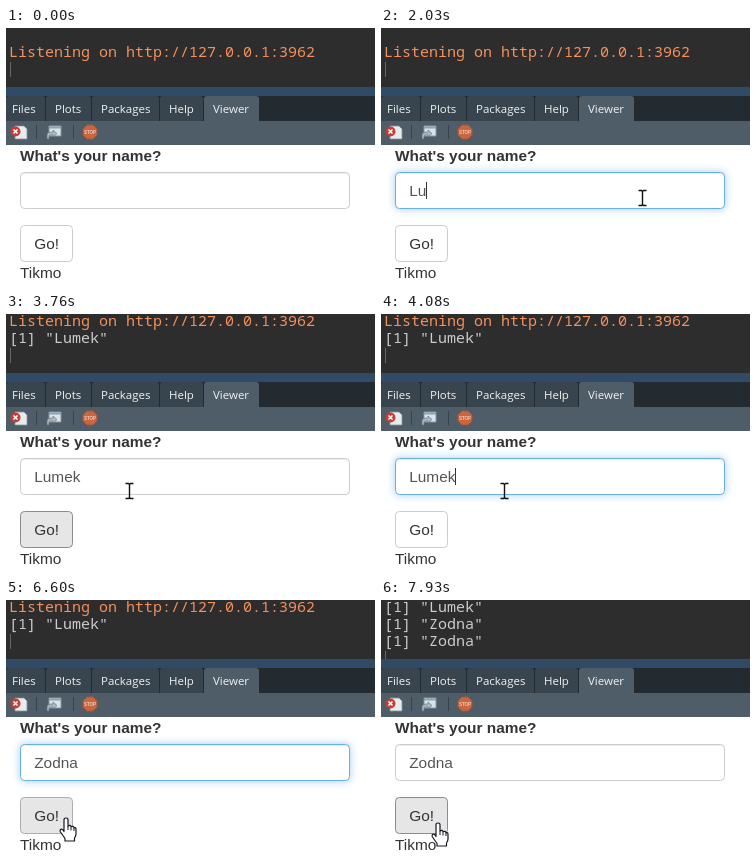
These frames come from a looping animation (369x258 px, 8000 ms). An HTML page:

```html
<!DOCTYPE html>
<html lang="en">
<head>
<meta charset="utf-8">
<style>
html, body { margin: 0; width: 100%; height: 100%; overflow: hidden; background: #fff; }
#stage { position: absolute; left: 0; top: 0; width: 369px; height: 258px; overflow: hidden; background: #fff;
  font: 15.4px/22px "Liberation Sans", Arial, sans-serif; color: #333; }
#stage div, #stage svg { position: absolute; box-sizing: border-box; white-space: pre; }
#console { left: 0; top: 0; width: 369px; height: 59px; overflow: hidden; background: #2d2d2d;
  font: 15px/17.3px "Noto Sans Mono", monospace; color: #ccc; }
#console div { left: 3px; }
#console .note { color: #f4905c; }
#console #prompt { left: 4px; width: 1px; height: 15px; background: #666; }
#label { left: 14px; top: 117px; font-weight: bold; }
#field { left: 14px; top: 144px; width: 330px; height: 37.4px; padding: 6.7px 13.2px; border: 1.1px solid; border-radius: 4.4px; color: #555; background: #fff; }
#caret { display: inline-block; width: 1px; height: 17px; margin-right: -1px; vertical-align: -3.5px; background: #333; }
#go { left: 14px; top: 197px; width: 53.4px; height: 37.4px; line-height: 35.2px; text-align: center; border: 1.1px solid; border-radius: 4.4px; }
#greeting { left: 14px; top: 233.7px; }
</style>
</head>
<body>
<div id="stage">
  <div id="console"></div>
  <svg id="panel" style="left:0;top:59px" width="369" height="58" viewBox="0 59 369 58">
    <rect y="59" width="369" height="58" fill="#314a66"/>
    <rect y="68" width="369" height="26" fill="#232b31"/>
    <g id="tabs" font-family="'Open Sans', 'Noto Sans', sans-serif" font-size="11.5" fill="#f0f2f3"></g>
    <rect y="93" width="369" height="24" fill="#4e5d68"/>
    <path d="M30.5 97v14M67.5 97v14" stroke="#37434c"/>
    <path d="M9 98h9l3 3v10H9z" fill="#e9ecee" stroke="#87939b" stroke-width=".8"/>
    <circle cx="9.5" cy="103.5" r="5" fill="#c83c34"/>
    <path d="M7.5 101.5l4 4m0-4l-4 4" stroke="#fff" stroke-width="1.5"/>
    <path d="M43 98h12v10H43z" fill="#dce3e7" stroke="#8494a0"/>
    <path d="M43 99.5h12" stroke="#8ba4b5" stroke-width="2"/>
    <path d="M41 111v-4q0-3 4-3h2v-2l4 3.5-4 3.5v-2h-2q-2 0-2 2v2z" fill="#a9b7c0" stroke="#60717d" stroke-width=".6"/>
    <path d="M81 97h6l4 4v6l-4 4h-6l-4-4v-6z" fill="#c9663f" stroke="#a5563b"/>
    <text x="84" y="106" text-anchor="middle" font-family="Liberation Sans, sans-serif" font-size="4.5" font-weight="bold" fill="#f0cbb9">STOP</text>
  </svg>
  <div id="label">What's your name?</div>
  <div id="field"><span id="value"></span><span id="caret"></span></div>
  <div id="go">Go!</div>
  <div id="greeting">Tikmo</div>
  <svg style="left:0;top:0" width="369" height="258">
    <g id="mouse">
      <circle id="halo" r="11" fill="#f0e428" fill-opacity=".72"/>
      <path id="beam" d="M-4 -7.5h3l1 1 1-1h3M-4 7.5h3l1-1 1 1h3M0 -7v14" fill="none" stroke="#111" stroke-width="1.4"/>
      <path id="hand" d="M-2 1.8Q-2 0 0 0T2 1.8V8Q4.5 6.5 5 8.7 7.5 7.6 8 9.8 10 9 10 11.5V16Q10 18 8.5 20V23H-1V20.5L-5.5 14Q-6.5 12-5 11.3T-2 13.5Z" fill="#fff" stroke="#15151f" stroke-width="1.2" stroke-linejoin="round"/>
      <path id="handLines" d="M2 8v4M5 9v3.5M8 10v3" stroke="#15151f"/>
      <path id="arrow" d="M0 0V16L3.7 12.5 6.2 18.3 8.7 17.2 6.2 11.6H11.2Z" fill="#fff" stroke="#111"/>
    </g>
  </svg>
</div>
<script>
const LOOP = 8000;
const $ = id => document.getElementById(id);
const FIRST = "Lumek", SECOND = "Zodna";

const tabs = [["Files", 0, 39, 6], ["Plots", 40, 85, 49], ["Packages", 86, 153, 95], ["Help", 154, 197, 163], ["Viewer", 198, 253, 207]];
$("tabs").innerHTML = tabs.map(([name, left, right, x]) =>
  `<path d="M${left} 94V71q0-3 3-3H${right - 3}q3 0 3 3V94z" fill="${name === "Viewer" ? "#4e5d68" : "#39454e"}"/>
   <text x="${x}" y="85">${name}</text>`).join("");

// [time, x, y]
const path = [[330, 292, 250], [740, 261.5, 170], [2660, 261.5, 170], [3130, 47, 215], [3500, 47, 215],
  [3750, 123.5, 177], [6410, 123.5, 177], [6600, 60, 218], [6690, 58, 228], [6820, 57, 224], [7270, 57, 224], [7280, 57, 223]];

// [time, text, caret end]
const typing = [[0, "", 0], [850, "", 1370], [1770, 1, 2030], [2030, 2, 2220], [2220, 3, 2290], [2290, 4, 2360], [2360, 5, 2860],
  [4010, 5, 4350], [5210, 1, 5410], [5410, 2, 5610], [5610, 3, 5810], [5810, 4, 6000], [6000, 5, 6500]];

const logs = [
  [0, ["", "Listening on http://127.0.0.1:3962"], 2],
  [3480, ["Listening on http://127.0.0.1:3962", `[1] "${FIRST}"`], 2],
  [7150, [`[1] "${FIRST}"`, `[1] "${SECOND}"`], 2],
  [7930, [`[1] "${FIRST}"`, `[1] "${SECOND}"`, `[1] "${SECOND}"`], 3]
];

const within = (t, ranges) => ranges.some(([a, b]) => t >= a && t < b);
const latest = (list, t) => list.filter(item => item[0] <= t).pop();
const clamp = v => Math.max(0, Math.min(1, v));
const mix = (a, b, k) => `rgb(${a.map((v, i) => Math.round(v + (b[i] - v) * k))})`;
const show = (id, on) => { $(id).style.display = on ? "" : "none"; };

function pointer(t) {
  const i = path.findIndex(p => p[0] > t);
  if (i < 0) return path[path.length - 1].slice(1);
  const a = path[Math.max(0, i - 1)], b = path[i];
  const k = clamp((t - a[0]) / (b[0] - a[0] || 1)), e = k * k * (3 - 2 * k);
  return [a[1] + (b[1] - a[1]) * e, a[2] + (b[2] - a[2]) * e];
}

let shownLog;
function drawConsole(t) {
  const log = latest(logs, t);
  if (log === shownLog) return;
  shownLog = log;
  const top = row => -2.4 + row * 17.3;
  $("console").innerHTML = log[1].map((line, row) =>
    `<div class="${line[0] === "L" ? "note" : ""}" style="top:${top(row)}px">${line}</div>`).join("") +
    `<div id="prompt" style="top:${top(log[2]) + 1.5}px"></div>`;
}

function drawField(t) {
  const [, count, caretEnd] = latest(typing, t);
  const selected = within(t, [[4350, 5210]]);
  const value = $("value");
  value.textContent = (t < 5210 ? FIRST : SECOND).slice(0, count || 0);
  value.style.background = selected ? "#3390ff" : "";
  value.style.color = selected ? "#fff" : "";
  const ramp = from => clamp((t - from) / 150);
  const focus = ramp(820) - ramp(3270) + ramp(3930) - ramp(6880);
  show("caret", t < caretEnd);
  $("field").style.borderColor = mix([204, 204, 204], [102, 175, 233], focus);
  $("field").style.boxShadow = `inset 0 1px 1px rgba(0,0,0,.075), 0 0 8px rgba(102,175,233,${0.6 * focus})`;
}

function drawButton(t, hover) {
  const pressed = within(t, [[3200, 3410], [6820, 7080], [7810, 7930]]);
  const focused = within(t, [[3200, 3930], [6820, LOOP]]);
  const style = $("go").style;
  style.background = pressed ? "#d4d4d4" : hover || focused ? "#e6e6e6" : "#fff";
  style.borderColor = focused ? "#8c8c8c" : hover ? "#adadad" : "#ccc";
  style.boxShadow = pressed ? "inset 0 3px 5px rgba(0,0,0,.125)" : "none";
  style.outline = pressed ? "1.5px solid #dda44c" : "none";
  style.outlineOffset = "-1px";
}

function draw(t) {
  const [x, y] = pointer(t);
  const overField = x > 14 && x < 344 && y > 144 && y < 181;
  const overButton = t >= 330 && x > 14 && x < 67 && y > 197 && y < 235;
  drawConsole(t);
  drawField(t);
  drawButton(t, overButton);
  show("mouse", t >= 330);
  $("mouse").setAttribute("transform", `translate(${x} ${y})`);
  show("beam", overField);
  show("hand", overButton);
  show("handLines", overButton);
  show("arrow", !overField && !overButton);
  show("halo", within(t, [[780, 950], [3200, 3410], [3890, 4080], [6820, 7080], [7810, 7930]]));
}

const start = performance.now();
function tick() {
  draw((performance.now() - start) % LOOP);
  requestAnimationFrame(tick);
}
tick();
</script>
</body>
</html>
```
